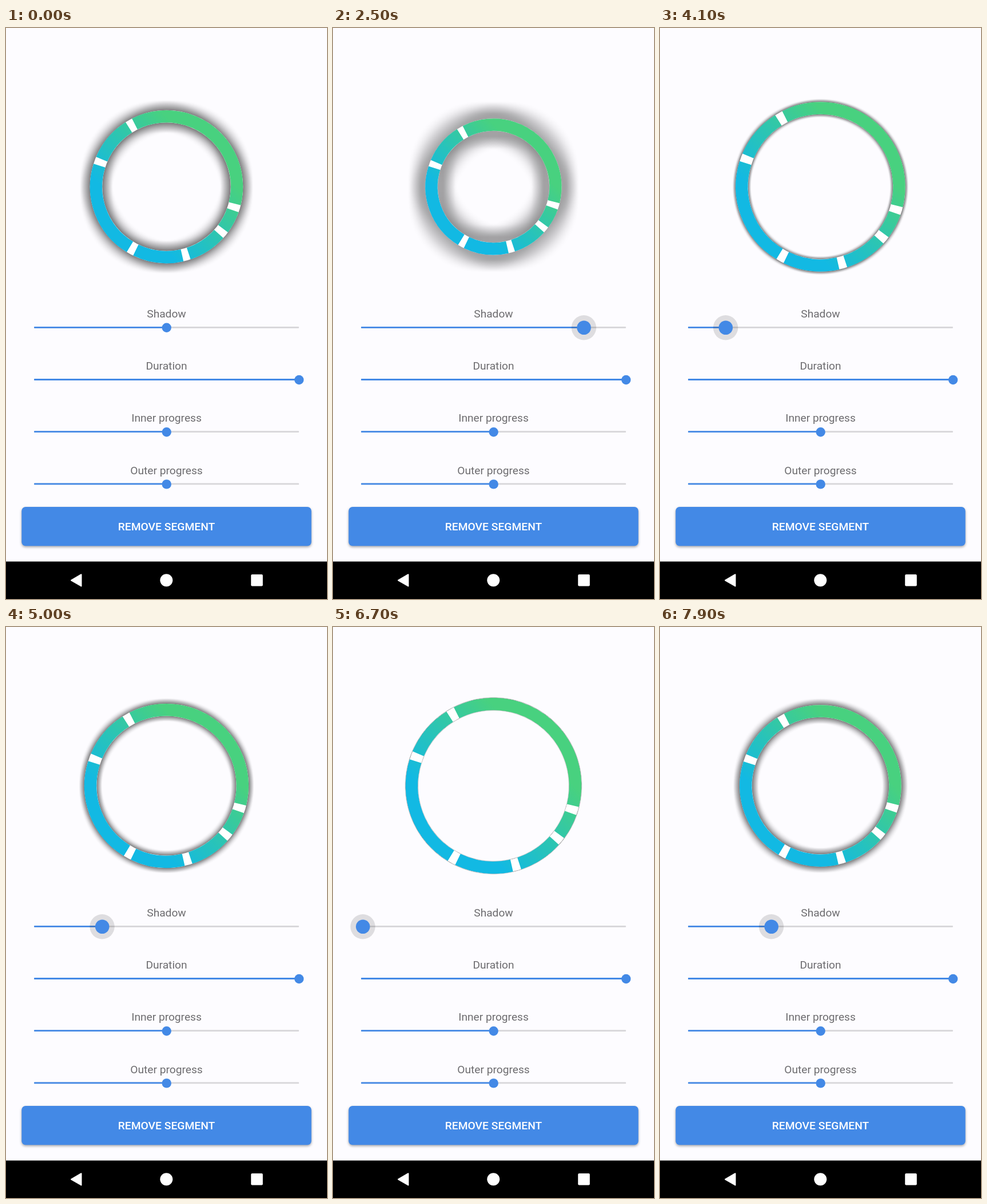
These frames come from a looping animation (561x998 px, 8000 ms). An HTML page with a canvas:

```html
<!DOCTYPE html>
<html lang="en">
<head>
<meta charset="utf-8">
<title>Segmented ring</title>
<style>
  html, body { margin: 0; width: 100%; height: 100%; overflow: hidden; background: #fdfcff; }
  canvas { display: block; }
</style>
</head>
<body>
<canvas id="stage" width="561" height="998"></canvas>
<script>
const ctx = document.getElementById('stage').getContext('2d');
const LOOP = 8000, STEP = 100, PRESS = 500;
const CX = 280.5, CY = 277.5, RING = 21.5;
const LEFT = 49, RIGHT = 512, MID = 280.5;
const BLUE = '#4389e6';
const GAPS = [16.7, 39.3, 74.4, 118.6, 200.3, 240.4]; // degrees, clockwise from the right
const GAP = 5.5;

// Turning points of the drag: [ms, x]
const TURNS = [
  [500, 280.5], [2250, 450], [4400, 98], [5000, 168],
  [5250, 111], [6400, 50], [6600, 50], [7900, 194.5]
];

// Offscreen layer for the box-blurred shadow
const SIZE = 333;
const layer = document.createElement('canvas');
layer.width = layer.height = SIZE;
const layerCtx = layer.getContext('2d');

const rad = deg => deg * Math.PI / 180;
const clamp = v => Math.min(1, Math.max(0, v));
const ease = u => (1 - Math.cos(Math.PI * u)) / 2;

function thumbAt(t) {
  const i = TURNS.findIndex(p => p[0] >= t);
  if (i === 0) return TURNS[0][1];
  const [t0, x0] = TURNS[i - 1], [t1, x1] = TURNS[i];
  return x0 + (x1 - x0) * ease((t - t0) / (t1 - t0));
}

function disc(x, y, r, color) {
  ctx.fillStyle = color;
  ctx.beginPath();
  ctx.arc(x, y, r, 0, 2 * Math.PI);
  ctx.fill();
}

function box(x, y, w, h, r, color) {
  ctx.fillStyle = color;
  ctx.beginPath();
  ctx.roundRect(x, y, w, h, r);
  ctx.fill();
}

function arc(r, from, to) {
  ctx.beginPath();
  ctx.arc(CX, CY, r, rad(from), rad(to));
  ctx.stroke();
}

function label(text, y, font, color) {
  ctx.font = font + ' Roboto, sans-serif';
  ctx.textAlign = 'center';
  ctx.fillStyle = color;
  ctx.fillText(text, MID, y);
}

// Averages each row over +-half pixels and returns the result transposed
function blurRows(src, half) {
  const out = new Float32Array(SIZE * SIZE);
  const sum = new Float32Array(SIZE + 1);
  const sumTo = p => {
    p = Math.min(SIZE, Math.max(0, p));
    const i = Math.min(SIZE - 1, Math.floor(p));
    return sum[i] + (sum[i + 1] - sum[i]) * (p - i);
  };
  for (let y = 0; y < SIZE; y++) {
    for (let x = 0; x < SIZE; x++) sum[x + 1] = sum[x] + src[y * SIZE + x];
    for (let x = 0; x < SIZE; x++) {
      const c = x + 0.5;
      out[x * SIZE + y] = (sumTo(c + half) - sumTo(c - half)) / (2 * half);
    }
  }
  return out;
}

function drawShadow(r, half) {
  const ring = new Float32Array(SIZE * SIZE);
  const mid = (SIZE - 1) / 2;
  for (let i = 0; i < ring.length; i++) {
    const d = Math.hypot(i % SIZE - mid, Math.floor(i / SIZE) - mid);
    ring[i] = clamp(RING / 2 + 0.5 - Math.abs(d - r));
  }
  const soft = blurRows(blurRows(ring, half), half);
  const image = layerCtx.createImageData(SIZE, SIZE);
  soft.forEach((a, i) => { image.data[i * 4 + 3] = a * 255; });
  layerCtx.putImageData(image, 0, 0);
  ctx.drawImage(layer, CX - SIZE / 2, CY - SIZE / 2);
}

function drawRing(x) {
  const r = 123 - (x - MID) * (x < MID ? 0.0875 : 0.0925);
  const outer = r + RING / 2;
  drawShadow(r, Math.max(0.7, (154.6 - outer) * 0.86));

  ctx.lineWidth = RING;
  ctx.strokeStyle = '#fff';
  arc(r, 0, 360);

  const a = outer * 0.6 * Math.SQRT1_2, b = outer * 0.65 * Math.SQRT1_2;
  const fade = ctx.createLinearGradient(CX - a, CY + a, CX + b, CY - b);
  fade.addColorStop(0, '#12b9e3');
  fade.addColorStop(1, '#48d17f');
  ctx.strokeStyle = fade;
  GAPS.forEach((g, i) => {
    const next = i + 1 < GAPS.length ? GAPS[i + 1] : GAPS[0] + 360;
    arc(r, g + GAP / 2, next - GAP / 2);
  });
}

function drawSlider(name, y, x, pressed) {
  label(name, y - 17.7, '400 19.15px', '#6d6c6f');
  box(LEFT, y - 1.7, RIGHT - LEFT, 2.8, 1, '#d7d6d9');
  box(LEFT, y - 1.7, x - LEFT, 2.8, 1, BLUE);
  if (pressed) disc(x, y + 0.2, 21.7, 'rgba(0,0,0,0.12)');
  disc(x + 0.2, y + 0.2, pressed ? 12.3 : 8.2, BLUE);
}

function drawButton() {
  ctx.save();
  ctx.shadowColor = 'rgba(0,0,0,0.35)';
  ctx.shadowBlur = 4;
  ctx.shadowOffsetY = 2;
  box(27.3, 837, 506.4, 68.2, 7, BLUE);
  ctx.restore();
  label('REMOVE SEGMENT', 878, '500 19.25px', '#fff');
}

function drawNav() {
  ctx.fillStyle = '#000';
  ctx.fillRect(0, 932.5, 561, 65.5);
  ctx.fillStyle = ctx.strokeStyle = '#fff';
  ctx.lineWidth = 2;
  ctx.lineJoin = 'round';
  ctx.beginPath();
  ctx.moveTo(114, 965.3);
  ctx.lineTo(131.5, 955.2);
  ctx.lineTo(131.5, 975.4);
  ctx.closePath();
  ctx.fill();
  ctx.stroke();
  disc(280.3, 965.2, 11, '#fff');
  box(428.2, 955, 20.6, 20.6, 2, '#fff');
}

function draw(t) {
  const pressed = t >= PRESS;
  const x = thumbAt(t);
  ctx.fillStyle = '#fdfcff';
  ctx.fillRect(0, 0, 561, 998);
  drawRing(x);
  ['Shadow', 'Duration', 'Inner progress', 'Outer progress'].forEach((name, i) => {
    const at = i === 0 ? x : i === 1 ? RIGHT : MID;
    drawSlider(name, 523.6 + 91.2 * i, at, pressed && i === 0);
  });
  drawButton();
  drawNav();
}

const start = performance.now();
let shown = -1;
function tick() {
  const t = Math.floor((performance.now() - start) % LOOP / STEP) * STEP;
  if (t !== shown) draw(shown = t);
  requestAnimationFrame(tick);
}
tick();
</script>
</body>
</html>
```
